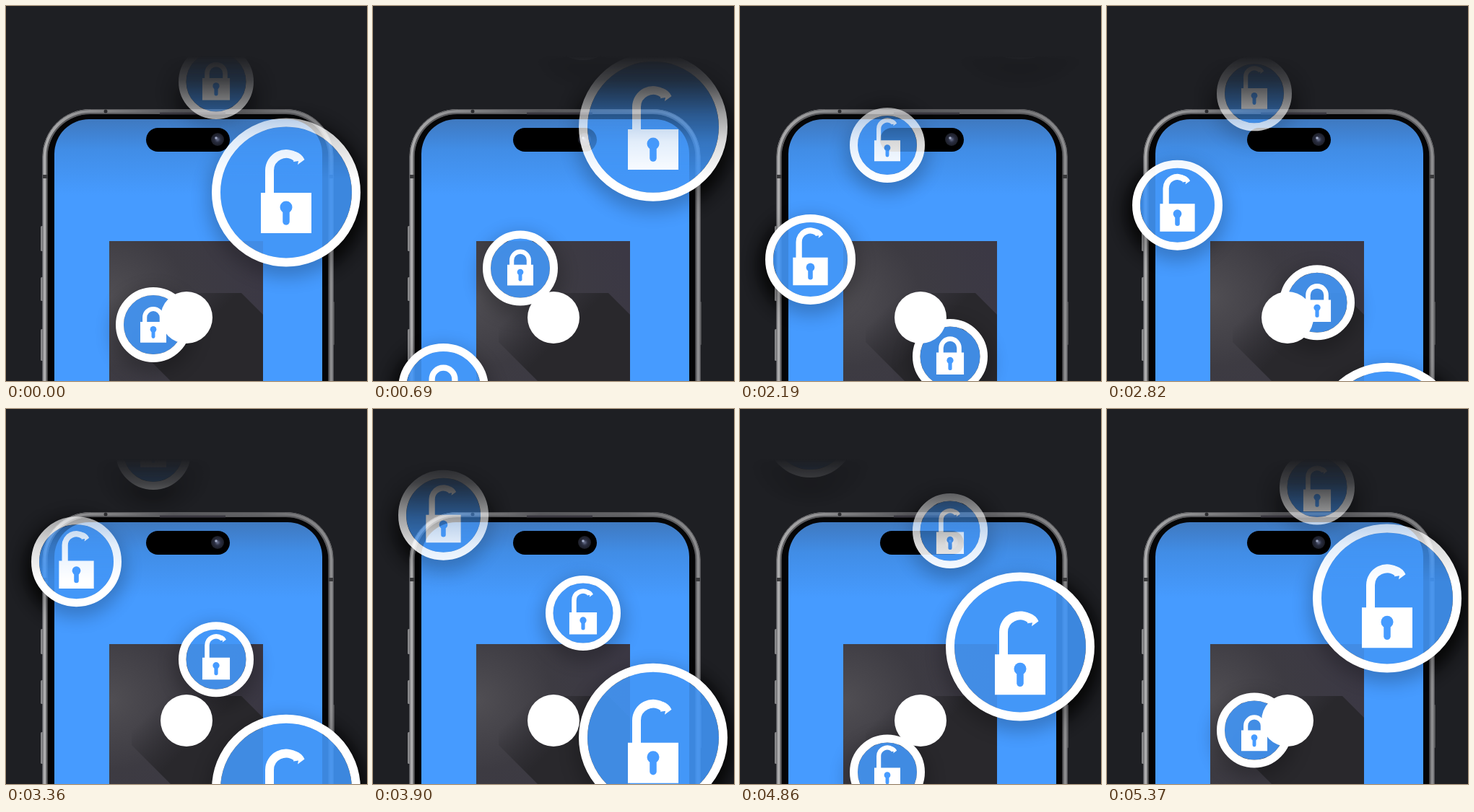
An HTML page for the animation above (5.4 s loop, 500 px wide and 520 px high).

```html
<!DOCTYPE html>
<html lang="en">
<head>
<meta charset="utf-8">
<title>Phone with floating locks</title>
<style>
html, body { margin: 0; width: 100%; height: 100%; overflow: hidden; background: #1e1f23; }
svg { display: block; }
.blur { filter: blur(12px); }
</style>
</head>
<body>
<svg width="500" height="520" viewBox="0 0 500 520">
  <defs>
    <linearGradient id="fadeRamp" gradientUnits="userSpaceOnUse" x1="0" y1="69" x2="0" y2="239">
      <stop offset="0" stop-color="#fff" stop-opacity="0"/>
      <stop offset=".2" stop-color="#fff" stop-opacity=".17"/>
      <stop offset=".48" stop-color="#fff" stop-opacity=".61"/>
      <stop offset=".7" stop-color="#fff" stop-opacity=".85"/>
      <stop offset="1" stop-color="#fff"/>
    </linearGradient>
    <mask id="fade" maskUnits="userSpaceOnUse" x="0" y="0" width="500" height="520">
      <rect y="69" width="500" height="451" fill="url(#fadeRamp)"/>
    </mask>
    <linearGradient id="metal" gradientUnits="userSpaceOnUse" x1="50" y1="0" x2="454" y2="0">
      <stop offset="0" stop-color="#aeaeaf"/>
      <stop offset=".2" stop-color="#858587"/>
      <stop offset=".45" stop-color="#57575b"/>
      <stop offset=".75" stop-color="#656568"/>
      <stop offset="1" stop-color="#8e8e90"/>
    </linearGradient>
    <linearGradient id="screen" gradientUnits="userSpaceOnUse" x1="0" y1="157" x2="0" y2="262">
      <stop offset="0" stop-color="#3f79c0"/>
      <stop offset=".4" stop-color="#418de6"/>
      <stop offset="1" stop-color="#469bff"/>
    </linearGradient>
    <radialGradient id="tile" cx="0" cy=".4" r="1">
      <stop offset="0" stop-color="#504e53"/>
      <stop offset=".5" stop-color="#3d3b42"/>
      <stop offset="1" stop-color="#3b3844"/>
    </radialGradient>
    <linearGradient id="cast" gradientUnits="userSpaceOnUse" x1="300" y1="320" x2="350" y2="370">
      <stop offset="0" stop-color="#29282c" stop-opacity="0"/>
      <stop offset="1" stop-color="#29282c"/>
    </linearGradient>
    <radialGradient id="lens">
      <stop offset="0" stop-color="#6b7390"/>
      <stop offset=".45" stop-color="#2b2f42"/>
      <stop offset="1" stop-color="#1c1e27"/>
    </radialGradient>
  </defs>

  <rect width="500" height="520" fill="#1e1f23"/>
  <g id="shadows" mask="url(#fade)"></g>

  <!-- phone -->
  <g fill="#88888a">
    <rect x="48" y="305" width="4" height="35" rx="1.5"/>
    <rect x="48" y="376" width="4" height="33" rx="1.5"/>
    <rect x="48" y="448" width="4" height="44" rx="1.5"/>
    <rect x="452" y="410" width="3" height="60" rx="1" fill="#4a4a4d"/>
  </g>
  <rect x="50.5" y="143" width="403" height="500" rx="66" fill="url(#metal)"/>
  <rect x="51" y="143.5" width="402" height="500" rx="65.5" fill="none" stroke="#59595c"/>
  <rect x="56.5" y="149" width="391" height="500" rx="60" fill="none" stroke="#5a5a5d" stroke-width="2"/>
  <rect x="57.5" y="150" width="389" height="500" rx="59" fill="#050506"/>
  <path d="M51 236.500H58M446 236.500H453" stroke="#3a3a3c" stroke-width="5"/>
  <path d="M213 149H304" stroke="#3a3840" stroke-width="3"/>
  <circle cx="138" cy="146" r="2.500" fill="#2c2c2f"/>
  <rect x="67" y="157" width="371" height="480" rx="48" fill="url(#screen)"/>
  <rect x="194" y="169" width="116" height="33" rx="16.500"/>
  <circle cx="293" cy="185" r="9" fill="url(#lens)"/>
  <circle cx="291" cy="183" r="1.800" fill="#a3acc8"/>
  <rect x="143" y="326" width="213" height="194" fill="url(#tile)"/>
  <path d="M174 466V398H326L356 428V520H228Z" fill="url(#cast)"/>

  <g id="bubbles" mask="url(#fade)"></g>
  <circle cx="250" cy="432" r="36" fill="#fff"/>
</svg>

<script>
const LOOP = 5400, STEP = 30, TOP = 69;

// y0: height at time 0; lift: distance climbed per loop; s: lock scale
// drop(t, wrapped): lock offset in the bubble; open(t): shackle state
const bubbles = [
  { x: 97.5, r: 62.5, ring: 11, s: .69, y0: 613, lift: 645,
    drop: t => .0013 * t - 5.6, open: t => t >= 2190 },
  { x: 204, r: 52, ring: 11, s: .515, y0: 442, lift: 614,
    drop: (t, wrapped) => !wrapped ? -4 - .0012 * t : t < 5100 ? -6 : 0,
    open: t => t >= 1140 && t < 5100 },
  { x: 291, r: 52, ring: 10.5, s: .545, y0: 105, lift: 641,
    drop: (t, wrapped) => wrapped ? .0026 * (t - 3900) - 1 : -5,
    open: t => t >= 3360 },
  { x: 388, r: 103, ring: 12, s: 1, y0: 258.5, lift: 710,
    drop: (t, wrapped) => .004 * t + (wrapped ? -8.6 : .5), open: () => true }
];

const $ = id => document.getElementById(id);

const markup = b => `<g>
  <circle class="blur" cy="9" r="${b.r + 6}" opacity=".22"/>
  <circle r="${b.r - b.ring}" fill="#469bff" fill-opacity=".87"/>
  <circle r="${b.r - b.ring / 2}" fill="none" stroke="#fff" stroke-width="${b.ring}"/>
  <g class="lock" fill="#fff">
    <path d="M-35 0H35V56H-35Z"/>
    <path class="closed" d="M-23 2V-12a23 23 0 0 1 46 0V2" fill="none" stroke="#fff" stroke-width="12"/>
    <g class="opened">
      <path d="M-23 2V-31A23 23 0 0 1 14 -49.200" fill="none" stroke="#fff" stroke-width="12"/>
      <path d="M13 -57Q22 -54 25.500 -46L16 -39L17 -44L10 -43Z"/>
    </g>
    <path d="M0 21V40" stroke="#469bff" stroke-width="9.500" stroke-linecap="round"/>
    <circle cy="20" r="8.500" fill="#469bff"/>
  </g>
</g>`;

$('bubbles').innerHTML = bubbles.map(markup).join('');
$('shadows').innerHTML = bubbles
  .map(b => `<circle class="blur" r="${b.r + 8}" opacity=".8"/>`).join('');

bubbles.forEach((b, i) => {
  b.node = $('bubbles').children[i];
  b.shade = $('shadows').children[i];
  [b.lock, b.closed, b.opened] = ['.lock', '.closed', '.opened'].map(q => b.node.querySelector(q));
});

function draw(t) {
  for (const b of bubbles) {
    let y = b.y0 - b.lift * t / LOOP;
    const wrapped = y < TOP - b.r;
    if (wrapped) y += b.lift;
    const open = b.open(t);
    b.node.setAttribute('transform', `translate(${b.x} ${y})`);
    b.shade.setAttribute('transform', `translate(${b.x} ${y + 8})`);
    b.lock.setAttribute('transform', `translate(0 ${b.drop(t, wrapped)}) scale(${b.s})`);
    b.opened.setAttribute('visibility', open ? 'visible' : 'hidden');
    b.closed.setAttribute('visibility', open ? 'hidden' : 'visible');
  }
}

const start = performance.now();
function tick() {
  const t = (performance.now() - start) % LOOP;
  draw(Math.floor(t / STEP) * STEP);
  requestAnimationFrame(tick);
}
tick();
</script>
</body>
</html>
```
